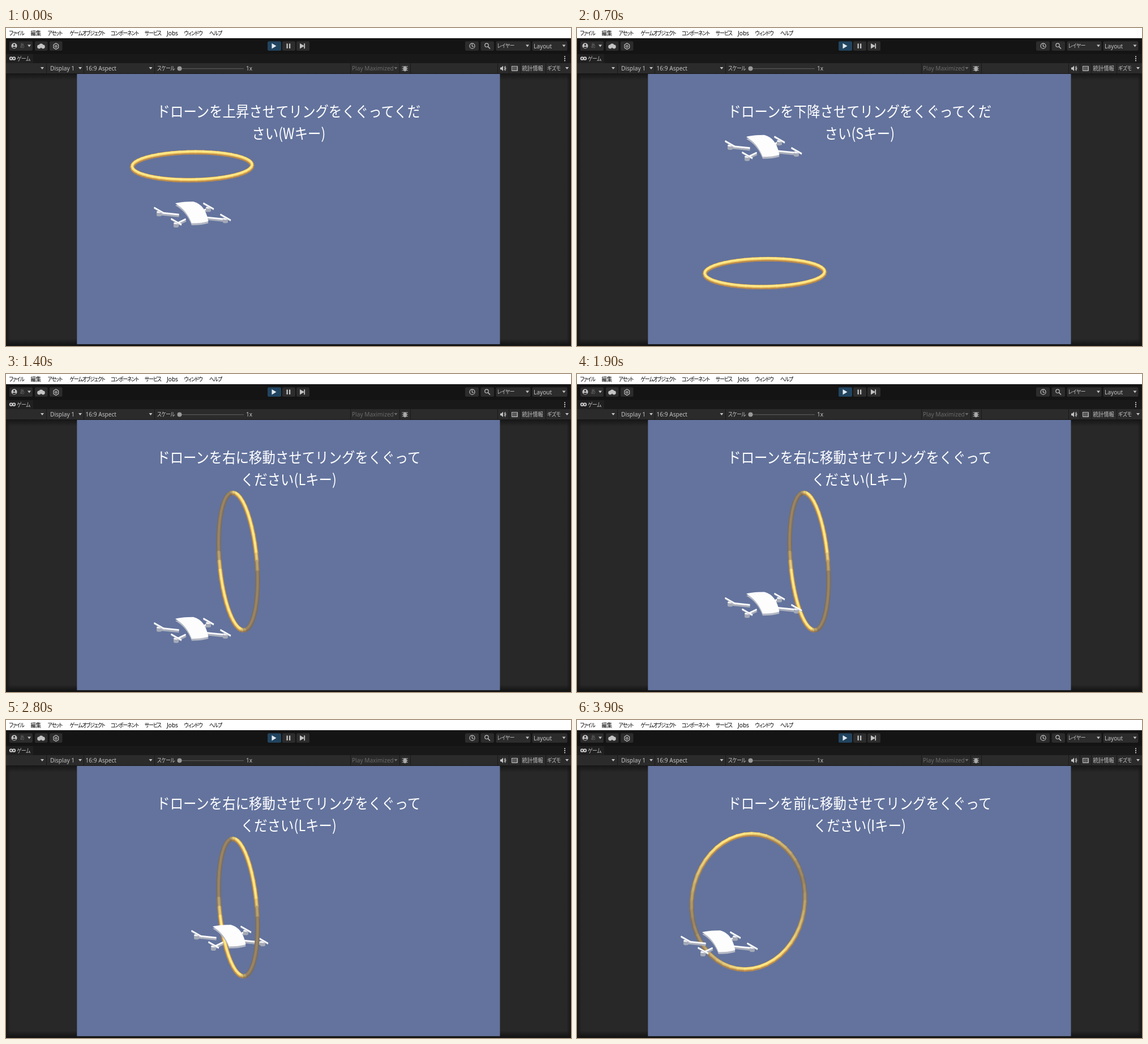
An HTML page with a canvas that plays this animation: 998 by 561 pixels, repeating every 4 s.

```html
<!DOCTYPE html>
<html lang="ja">
<head>
<meta charset="utf-8">
<style>
html, body { margin: 0; width: 998px; height: 561px; overflow: hidden; background: #191919; }
body { position: relative; }
canvas, #labels { position: absolute; left: 0; top: 0; }
/* The whole screen is shown at a narrowed aspect ratio. */
#labels { width: 1133px; height: 561px; transform: scaleX(.881); transform-origin: 0 0;
  font-family: "Noto Sans", "Noto Sans CJK JP", "Noto Sans CJK", sans-serif; }
#labels div { position: absolute; white-space: pre; line-height: 20px; font-size: 11.5px; color: #c4c4c4; }
#labels .kana, #labels .kanji, #labels .title { font-family: "Noto Sans CJK JP", "Noto Sans CJK", sans-serif; }
#labels .kana { font-size: 10px; font-feature-settings: "palt"; letter-spacing: -.5px; }
#labels .kanji { font-size: 10.6px; }
#labels .menu { color: #000; }
#labels .menu.kana { letter-spacing: -1.2px; }
#labels .dim { color: #6a6a6a; }
#labels .title { left: 295.5px; width: 20.4em; text-align: center; color: #fff;
  font-size: 26.6px; line-height: 39px; white-space: normal; }
</style>
</head>
<body>
<canvas id="stage" width="998" height="561"></canvas>
<div id="labels"></div>
<script>
const ctx = document.getElementById('stage').getContext('2d');
const labels = document.getElementById('labels');
const LOOP = 4000, STEP = 100, ASPECT = .881;
const INK = '#c4c4c4', BUTTON = '#2c2c2c';

function label(text, x, middle, kind = '') {
  const script = /[一-龠]/.test(text) ? 'kanji' : /[ぁ-ヶ]/.test(text) ? 'kana' : '';
  const el = document.createElement('div');
  el.textContent = text;
  el.className = `${kind} ${script}`;
  el.style.left = x / ASPECT + 'px';
  el.style.top = middle - (script ? 10.5 : 10) + 'px';
  labels.append(el);
}
[['ファイル', 5.5], ['編集', 43.5], ['アセット', 73.5], ['ゲームオブジェクト', 112.5], ['コンポーネント', 185],
 ['サービス', 245], ['Jobs', 284], ['ウィンドウ', 314.5], ['ヘルプ', 359]]
  .forEach(([text, x]) => label(text, x, 9, 'menu'));
label('あ', 24.5, 31.5, 'dim');
label('レイヤー', 867.5, 31.5);
label('Layout', 932, 32);
label('ゲーム', 19, 54);
label('スケール', 267, 71);
label('統計情報', 911.5, 71);
label('ギズモ', 956, 71);
label('Display 1', 78, 71);
label('16:9 Aspect', 140.5, 71);
label('1x', 424, 71);
label('Play Maximized', 611, 71, 'dim');

const title = document.createElement('div');
title.className = 'title';
title.style.top = '126px';
labels.append(title);

const clamp = n => Math.max(0, Math.min(1, n));
const mix = (a, b, k) => `rgb(${a.map((n, i) => Math.round(n + (b[i] - n) * k))})`;
const ease = (t, from, to) => (1 - Math.cos(Math.PI * clamp((t - from) / (to - from)))) / 2;

// Each ring is a leaning ellipse; lit() gives its brightness around the rim.
const rings = {
  flat: { rx: 106, ry: 24.7, lean: 6, lit: () => 1, near: a => Math.sin(a) < 0 },
  side: { rx: 33.2, ry: 121.5, lean: -9.5, lit: a => clamp(.5 + 1.6 * Math.sin(2 * a)), near: a => Math.cos(a) > 0 },
  facing: { rx: 100.2, ry: 119.5, lean: 6, lit: a => Math.abs(Math.sin(a - .35)) ** 1.3, near: () => false },
};
const lessons = [
  { from: 0, ring: rings.flat, x: 328.7, y: 243.5, move: '上昇', key: 'W' },
  { from: 600, ring: rings.flat, x: 331.5, y: 432, move: '下降', key: 'S' },
  { from: 1300, ring: rings.side, x: 410, y: 330.5, move: '右に移動', key: 'L' },
  { from: 2900, ring: rings.side, x: 251.3, y: 346, move: '左に移動', key: 'J' },
  { from: 3700, ring: rings.facing, x: 302.5, y: 320.3, move: '前に移動', key: 'I' },
];

function dronePosition(t) {
  const x = 88 * ease(t, 2400, 3000) - 166 * ease(t, 3000, 3900);
  const y = -122 * ease(t, 0, 800) + 253 * ease(t, 800, 1480)
    - 76 * ease(t, 1480, 2150) + 10 * ease(t, 3300, 3900);
  return [329 + x, 327.5 + y];
}

function rect(x, y, w, h, color) { ctx.fillStyle = color; ctx.fillRect(x, y, w, h); }
function trace(pts) {
  ctx.beginPath();
  for (let i = 0; i < pts.length; i += 2) ctx.lineTo(pts[i], pts[i + 1]);
}
function poly(color, ...pts) { trace(pts); ctx.fillStyle = color; ctx.fill(); }
function line(color, width, ...pts) {
  trace(pts);
  ctx.strokeStyle = color;
  ctx.lineWidth = width;
  ctx.stroke();
}
function disc(x, y, rx, color, ry = rx) {
  ctx.fillStyle = color;
  ctx.beginPath();
  ctx.ellipse(x, y, rx, ry, 0, 0, 7);
  ctx.fill();
}
function circle(x, y, r) {
  ctx.strokeStyle = INK;
  ctx.lineWidth = 1.2;
  ctx.beginPath();
  ctx.arc(x, y, r, 0, 7);
  ctx.stroke();
}
function button(x, w, color = BUTTON) {
  ctx.fillStyle = color;
  ctx.beginPath();
  ctx.roundRect(x, 23.5, w, 16.5, 2);
  ctx.fill();
}
function shade(x, y, w, h, dx, dy) {
  const g = ctx.createLinearGradient(dx < 0 ? x + w : x, dy < 0 ? y + h : y, dx > 0 ? x + w : x, dy > 0 ? y + h : y);
  g.addColorStop(0, '#161616');
  g.addColorStop(1, '#16161600');
  rect(x, y, w, h, g);
}
const arrow = (x, y, color = INK) => poly(color, x - 3, y - 2, x + 3, y - 2, x, y + 2);
const play = (x, color) => poly(color, x, 27, x + 8, 31.7, x, 36.5);

function drawPanels() {
  rect(0, 0, 998, 561, '#141414');
  rect(0, 0, 998, 18, '#fff');
  rect(0, 46, 998, 16, '#191919');
  rect(0, 46, 48, 16, '#202020');
  rect(0, 62, 998, 18, '#2b2b2b');
  rect(0, 80, 998, 478, '#282828');
  shade(0, 80, 998, 12, 0, 1);
  shade(0, 548, 998, 10, 0, -1);
  shade(0, 80, 8, 478, 1, 0);
  shade(990, 80, 8, 478, -1, 0);
  rect(125.3, 81, 747.2, 476.8, '#63739d');
}

function drawToolbar() {
  button(6, 41);
  disc(14.5, 31.5, 5, INK);
  disc(14.5, 29.8, 1.7, BUTTON);
  disc(14.5, 34.2, 3, BUTTON, 1.3);
  arrow(41, 31.5);
  button(51, 22.5);
  for (const side of [-1, 0, 1]) disc(62 + 3.4 * side, 31 + 2 * Math.abs(side), 3.4, INK);
  button(77, 22.5);
  const hexagon = Array.from({ length: 14 }, (_, i) =>
    i % 2 ? 32.2 - 5.4 * Math.cos((i - 1) * Math.PI / 6) : 88.3 + 5 * Math.sin(i * Math.PI / 6));
  line(INK, 1.2, ...hexagon);
  circle(88.3, 32.2, 1.7);

  button(462, 24, '#21445f');
  play(469.5, '#e3ebf1');
  button(488, 23);
  for (const x of [495.5, 500]) rect(x, 27.5, 2.3, 8.5, INK);
  button(513, 23);
  play(519, INK);
  rect(526.3, 27.3, 1.8, 9, INK);

  button(811, 24);
  circle(823.5, 31.7, 4.5);
  line(INK, 1.2, 823.3, 28.5, 823.3, 32, 826, 33);
  button(838.5, 23.5);
  circle(849, 30.3, 3.2);
  line(INK, 1.4, 851.3, 32.8, 855, 36.5);
  button(865.5, 61);
  arrow(921, 31.5);
  button(929.5, 62);
  arrow(985.5, 31.5);
}

function drawGameBar() {
  for (const x of [9, 14]) { disc(x, 53.8, 3.2, INK); disc(x, 53.8, 1.2, '#202020'); }
  for (let i = 0; i < 3; i++) rect(986, 49.5 + 3.5 * i, 2, 2, INK);
  for (const x of [71, 137, 262, 608, 695, 714, 868, 888, 908, 953]) rect(x, 62, 1, 18, '#191919');
  for (const x of [64, 131, 255.5, 991]) arrow(x, 71);
  arrow(688.5, 71, '#6a6a6a');
  rect(304, 71, 116, 1.3, '#555');
  disc(306.5, 71.5, 4, '#999');

  disc(704.8, 72, 3.2, '#aaa', 4.4);
  for (let y = 68; y < 77; y += 3.3) line('#aaa', 1, 699.5, y, 710, y);
  poly(INK, 873, 69.5, 875, 69.5, 878, 66.5, 878, 76, 875, 73.2, 873, 73.2);
  for (const r of [2.8, 4.3]) line(INK, 1.1, 877.2 + r, 71.2 - r, 878.6 + r, 71.2, 877.2 + r, 71.2 + r);
  line(INK, 1, 893.5, 67.5, 903.5, 67.5, 903.5, 75.5, 893.5, 75.5, 893.5, 67);
  for (let i = 0; i < 9; i++) rect(895 + 3 * (i % 3), 69 + 2.2 * Math.floor(i / 3), 1.7, 1.2, INK);
}

function drawRing({ ring, x, y }, front) {
  const N = 48, half = Math.PI / N + .012;
  const layers = [
    [8, .4, [126, 109, 88], [188, 138, 76]],
    [5, -.8, [146, 126, 97], [246, 209, 104]],
    [2.2, -1.4, [154, 134, 103], [255, 236, 145]],
  ];
  for (const [width, dy, dark, light] of layers) {
    for (let i = 0; i < N; i++) {
      const a = (i + .5) / N * Math.PI * 2;
      if (ring.near(a) !== front) continue;
      const ends = [a - half, a + half].flatMap(b => [
        x + ring.rx * Math.cos(b) + ring.lean * Math.sin(b),
        y - ring.ry * Math.sin(b) + dy]);
      line(mix(dark, light, ring.lit(a)), width, ...ends);
    }
  }
}

function drawArm(x, y) {
  line('#a9aebb', 4.4, x, y + 6.5, x * .4, y * .4 + 6.5);
  line('#fcfcfd', 2.8, x, y + 4, x * .4, y * .4 + 4);
  rect(x - 4.5, y + 3, 9, 6, '#a4a9b7');
  disc(x, y + 9, 4.5, '#a4a9b7', 1.8);
  disc(x, y + 3, 4.5, '#f4f4f6', 1.8);
  line('#c6c9d2', 1.6, x - 9, y - 3.5, x + 9.5, y + 7);
  line('#fff', 2.4, x - 9, y - 5, x + 9.5, y + 5.5);
}

function drawBody(dy, color) {
  ctx.fillStyle = color;
  ctx.beginPath();
  ctx.moveTo(-30, -18 + dy);
  ctx.quadraticCurveTo(-22, -21 + dy, 2, -21.3 + dy);
  ctx.quadraticCurveTo(23, -16 + dy, 28.5, 13.5 + dy);
  ctx.quadraticCurveTo(16, 17 + dy, -1, 17 + dy);
  ctx.quadraticCurveTo(-10, -7 + dy, -30, -18 + dy);
  ctx.fill();
}

function drawDrone(x, y) {
  ctx.save();
  ctx.translate(x, y);
  for (const side of [1, -1]) drawArm(28.5 * side, -13.8 * side);
  for (const side of [-1, 1]) drawArm(58.5 * side, 6 * side);
  drawBody(3.5, '#b4b8c4');
  drawBody(0, '#fdfdfd');
  ctx.restore();
}

function frame(now) {
  const t = Math.floor(now % LOOP / STEP) * STEP;
  const lesson = lessons.findLast(s => t >= s.from);
  const text = `ドローンを${lesson.move}させてリングをくぐってください(${lesson.key}キー)`;
  if (title.textContent !== text) title.textContent = text;
  drawPanels();
  drawToolbar();
  drawGameBar();
  drawRing(lesson, false);
  drawDrone(...dronePosition(t));
  drawRing(lesson, true);
}

const start = performance.now();
function tick() {
  frame(performance.now() - start);
  requestAnimationFrame(tick);
}
tick();
</script>
</body>
</html>
```
